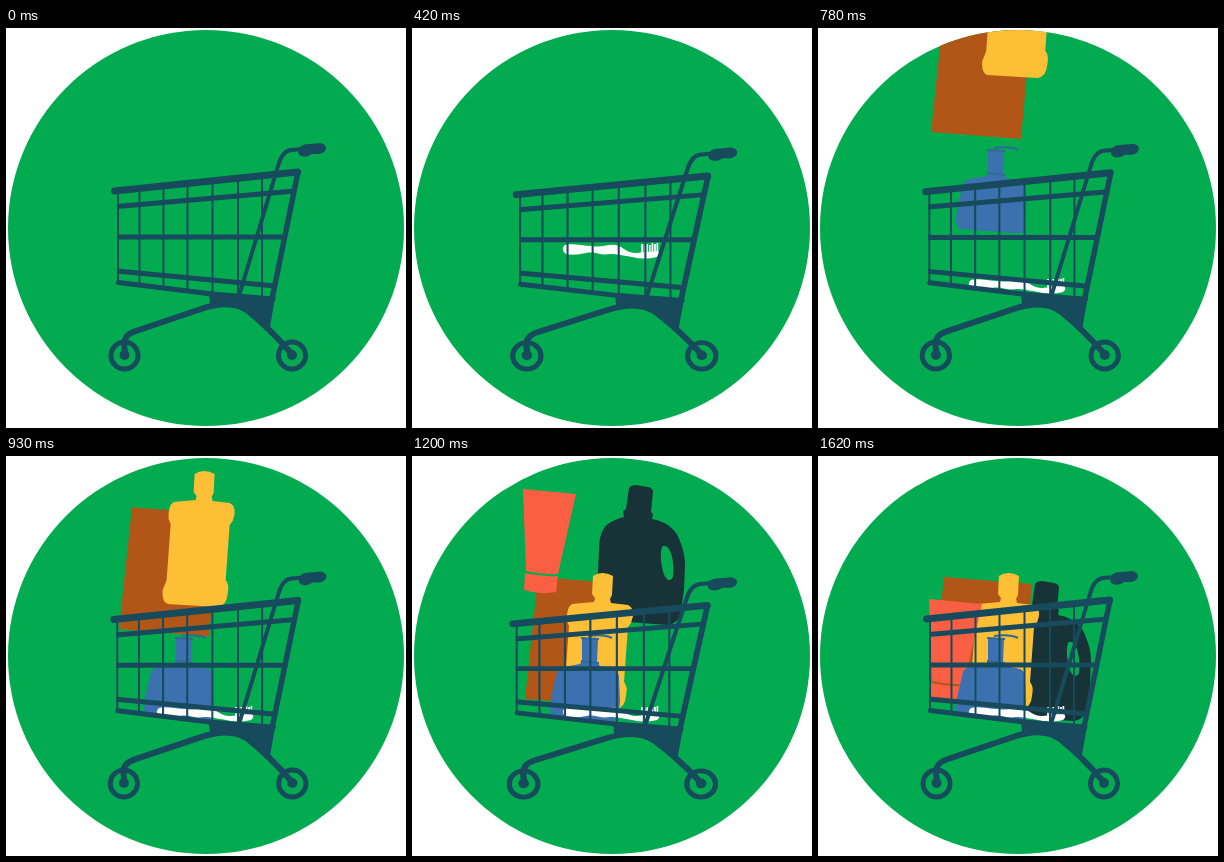
Write an HTML page that moves like this. It is 400x400 px and loops after 1.72 s.

```html
<!DOCTYPE html>
<html lang="en">
<head>
<meta charset="utf-8">
<title>Filling the cart</title>
<style>
  html, body { margin: 0; width: 100%; height: 100%; overflow: hidden; background: #fff; }
  svg { display: block; width: 100vw; height: 100vh; }
  #cart { fill: none; stroke: #174a5c; stroke-linecap: round; stroke-linejoin: round; }
  #cart .solid { fill: #174a5c; stroke: none; }
</style>
</head>
<body>
<svg viewBox="0 0 400 400">
  <defs><clipPath id="disc"><circle cx="200" cy="200" r="198"/></clipPath></defs>
  <circle cx="200" cy="200" r="198" fill="#02ab50"/>
  <g clip-path="url(#disc)">
    <path id="box" fill="#b25617" d="M126 121L214 128L203 250L113 243Z"/>

    <path id="detergent" fill="#173338" fill-rule="evenodd" d="M217 128Q219 125 224 125L236 127Q241 128 241 132
      L239 152L241 154L240 159C256 162 265 170 269 184Q273 194 273 205L272 230L269 250Q267 264 255 265
      L191 260Q184 259 184 250L187 190Q187 168 199 162Q206 158 212 157L211 151L214 149Z
      M251 186C247 189 249 211 254 218Q258 223 261 217C263 204 259 184 251 186Z"/>

    <path id="bottle" fill="#fdbf35" d="M181 120Q190 114 201 120L200 139L198 143L199 147L216 149Q222 152 221 160
      L219 167L216 171L212 226Q216 230 214 240Q213 252 204 253L154 250Q148 248 149 236L153 226L157 170
      L155 165Q154 152 160 148L182 146L183 142L180 138Z"/>

    <g id="tube" fill="#fa5f43">
      <path d="M111 143L164 148L146 228Q130 229 114 225Z"/>
      <path d="M113 227Q130 231 146 230L144 246Q128 249 112 244Z"/>
    </g>

    <g id="pump">
      <path fill="#3b71ae" d="M170 182L186 183L185 206L188 210L202 213Q207 215 207 222L208 246L206 262Q204 266 197 265
        L144 261Q138 260 138 253L139 242L145 216Q147 212 152 211L168 208L170 204Z"/>
      <path fill="none" stroke="#2f6a96" stroke-width="2" d="M169 182L187 183M176 180Q192 178 200 182M169 205L187 207"/>
    </g>

    <g id="brush">
      <path fill="#fff" d="M153 252C160 250 170 253 180 253C190 255 196 251 204 252C212 254 214 260 224 260
        L246 258Q249 261 245 264Q232 267 220 264C208 262 206 261 198 261C188 263 184 258 174 260
        Q162 263 154 261Q148 256 153 252Z"/>
      <path fill="none" stroke="#fff" stroke-width="1.7" d="M230 260V251M232.6 260V252M235.2 260V251M237.8 260V252M240.4 260V250M243 260V251M245.4 260V250"/>
    </g>

    <g id="cart">
      <path id="bars" stroke-width="2"/>
      <path stroke-width="5" stroke-linecap="butt" d="M111 178.500L289 163M111 209H280M111 243L269 258"/>
      <path stroke-width="5" d="M112.500 254.500L206 266L267 271"/>
      <path stroke-width="7" d="M108.500 163L291.500 144"/>
      <path stroke-width="5.500" d="M292 144L265 276"/>
      <path stroke-width="4" d="M233 268L272 138Q276 123 285 122L298 121"/>
      <path class="solid" d="M294 119Q296 116 304 116L314 115Q320 116 320 120.500Q319 125 313 126L306 126Q301 130 295 128
        Q291 126 293 122Z"/>
      <path stroke-width="6" d="M119 324C116 310 121 306 130 303L195 281C215 274 231 275 242 283C258 296 271 309 284 324"/>
      <path class="solid" d="M203 264L269 270L264 299Q258 297 248 287Q238 278 228 277L204 277Z"/>
      <g id="wheels" stroke-width="5"></g>
    </g>
  </g>
</svg>
<script>
const LOOP = 1720, STEP = 30, LAST = 1620;
const $ = id => document.getElementById(id);
const cart = $('cart');

$('bars').setAttribute('d', [112, 133.5, 157.5, 181.5, 206.5, 232, 256]
  .map(x => `M${x} ${162 - (x - 112) * 0.1}V${254 + (x - 112) * 0.11}`).join(''));

$('wheels').innerHTML = [118.5, 286].map(x =>
  `<circle cx="${x}" cy="327.500" r="13.500"/><circle class="solid" cx="${x}" cy="327" r="5"/>`).join('');

// Each item is `height` above its resting place `lead` ms before it lands.
const items = [
  { id: 'brush', land: 520, lead: 100, height: 35 },
  { id: 'pump', land: 880, lead: 100, height: 60 },
  { id: 'box', land: 1145, lead: 365, height: 139 },
  { id: 'bottle', land: 1145, lead: 365, height: 203, drift: 0.075 },
  { id: 'detergent', land: 1372, lead: 172, height: 96 },
  { id: 'tube', land: 1372, lead: 172, height: 110 }
];
for (const item of items) item.node = $(item.id);

const squashKeys = [[240, 0], [510, 0.06], [860, 0], [1230, 0.061], [1580, 0]];

function squash(t) {
  for (let i = 1; i < squashKeys.length; i++) {
    const [t0, a] = squashKeys[i - 1], [t1, b] = squashKeys[i];
    if (t >= t0 && t < t1) {
      const u = (t - t0) / (t1 - t0);
      return a + (b - a) * u * u * (3 - 2 * u);
    }
  }
  return 0;
}

function draw(time) {
  const t = time < 60 ? 0 : Math.min(LAST, Math.floor(time / STEP) * STEP);
  for (const { node, land, lead, height, drift = 0 } of items) {
    const up = height * Math.pow(Math.max(0, land - t) / lead, 1.3);
    node.setAttribute('transform', `translate(${up * drift} ${-up})`);
  }
  const s = squash(t), shift = t > 860 ? -33 * s : 0;
  cart.setAttribute('transform',
    `translate(${201 + shift} 344) scale(${1 + s} ${1 - 0.45 * s}) translate(-201 -344)`);
}

const start = performance.now();
function tick() {
  draw((performance.now() - start) % LOOP);
  requestAnimationFrame(tick);
}
tick();
</script>
</body>
</html>
```
